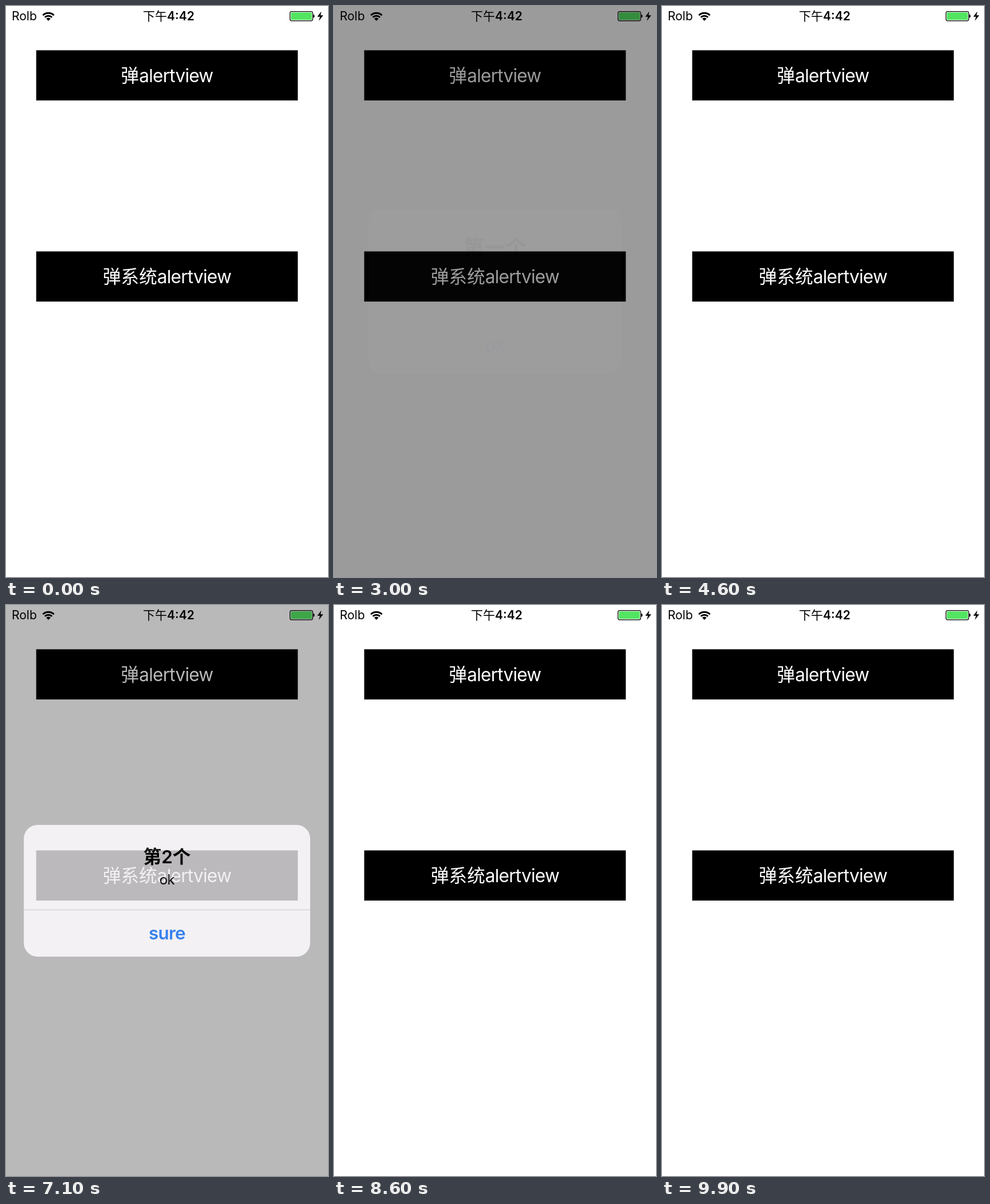
Animation of 562x997 px, one loop 10 s. Source, as an HTML page:

```html
<!DOCTYPE html>
<html lang="zh">
<head>
<meta charset="utf-8">
<title>alertview</title>
<style>
html, body { margin: 0; width: 100%; height: 100%; overflow: hidden; background: #fff; }
svg { display: block; width: 100%; height: 100%; }
text { font-family: Inter, "Noto Sans CJK SC", "Noto Sans CJK", sans-serif; }
.mid { text-anchor: middle; }
.tight { letter-spacing: -.025em; }
.label { font-size: 31.6px; }
</style>
</head>
<body>
<svg viewBox="0 0 562 997">
  <defs>
    <clipPath id="panelClip"><rect id="clipBox"/></clipPath>
    <filter id="soft" x="-20%" y="-100%" width="140%" height="300%"><feGaussianBlur stdDeviation="18"/></filter>
    <text id="sysLabel" class="label mid" x="281" y="483.8">弹系统<tspan class="tight">alertview</tspan></text>
  </defs>
  <rect width="562" height="997" fill="#fff"/>

  <text x="10" y="25.4" font-size="21">Rolb</text>
  <g fill="none" stroke="#000" stroke-width="2.8">
    <path d="M64.3 16.3A13.7 13.7 0 0 1 83.7 16.3M67.8 19.8A8.8 8.8 0 0 1 80.2 19.8"/>
    <path d="M74 26L70.1 22.1A5.5 5.5 0 0 1 77.9 22.1Z" fill="#000" stroke="none"/>
  </g>
  <text x="239" y="25.4" font-size="21" font-weight="600"><tspan font-weight="500">下午</tspan>4:42</text>
  <rect x="495.6" y="9.6" width="39.8" height="16.2" rx="3" fill="#fff" stroke="#000" stroke-width="1.2"/>
  <rect x="497.2" y="11.2" width="36.6" height="13" rx="1.5" fill="#53e562"/>
  <path d="M536.3 14.6Q538.6 15.2 538.6 17.7T536.3 20.8Z"/>
  <path d="M550.3 9.5L543.3 18.8H548L546 26L553.7 16.3H549Z"/>

  <rect x="52.7" y="77.3" width="456.6" height="87.6"/>
  <rect x="52.7" y="428.5" width="456.6" height="87.6"/>
  <g fill="#fff">
    <text class="label mid" x="281" y="132.6">弹<tspan class="tight">alertview</tspan></text>
    <use href="#sysLabel"/>
  </g>

  <rect id="dim" width="562" height="997" fill="#050005"/>
  <g id="panel">
    <g clip-path="url(#panelClip)">
      <rect width="562" height="997" fill="#fdfbfe"/>
      <g id="band">
        <rect id="bandBox" x="52.7" y="428.5" width="456.6" height="87.6"/>
        <use href="#sysLabel" fill="#fdfbfe"/>
      </g>
    </g>
    <g id="content">
      <text id="title" class="mid" x="281" font-weight="600"/>
      <text id="message" class="mid tight" x="281"/>
      <path id="rule" stroke="#d4d2d6" stroke-width="1.2"/>
      <text id="button" class="mid tight" x="281" fill="#1f78fa"/>
    </g>
  </g>
</svg>
<script>
const LOOP = 10000, STEP = 100, CX = 281, CY = 498.5;
const $ = id => document.getElementById(id);
const set = (id, attrs) => {
  for (const k in attrs) $(id).setAttribute(k, attrs[k]);
};

// Panel layouts; rest is the settled scale, grow and fade shape the entrance.
const custom = {
  x: 71, y: 362, w: 420, h: 273, r: 21, rest: .89, grow: .18, fade: .98, dimIn: 0,
  band: '#bebcbe', title: [35.1, 438], message: [28, 494], rule: 541.7, button: [31.6, 599], weight: 400
};
const system = {
  x: 31, y: 384, w: 500, h: 230, r: 24, rest: .948, grow: .2, fade: .55, dimIn: 1.1,
  band: '#dcdadc', title: [31.5, 450.8], message: [24, 487.5], rule: 532.3, button: [31.5, 584.5], weight: 600
};

// from/to: visible span, start: entrance origin, press: button held, out: fade begins.
const alerts = [
  { kind: custom, from: 1300, to: 3000, start: 1253, press: 2600, text: ['第2个', 'welcome', 'sure'] },
  { kind: custom, from: 3000, to: 4600, start: 3000, press: 4000, text: ['第一个', 'welcome', 'ok'] },
  { kind: system, from: 7100, to: 8600, start: 6937, out: 8100, text: ['第2个', 'ok', 'sure'] },
  { kind: system, from: 8700, to: 9900, start: 8100, out: 9500, text: ['第一个', 'welcome', 'sure'] }
];

let shown = null;

function layout(alert) {
  const k = alert.kind;
  set('clipBox', { x: k.x, y: k.y, width: k.w, height: k.h, rx: k.r });
  set('bandBox', { fill: k.band });
  set('rule', { d: `M${k.x} ${k.rule}h${k.w}` });
  ['title', 'message', 'button'].forEach((id, i) => {
    set(id, { 'font-size': k[id][0], y: k[id][1] });
    $(id).textContent = alert.text[i];
  });
  set('button', { 'font-weight': k.weight });
}

function render(t) {
  const alert = alerts.find(a => t >= a.from && t < a.to);
  set('panel', { visibility: alert ? 'visible' : 'hidden' });
  if (!alert) return set('dim', { opacity: 0 });
  if (alert !== shown) layout(shown = alert);

  const k = alert.kind;
  const n = (t - alert.start) / STEP;
  const e = n > 6 ? 0 : Math.pow(.45, n);
  const out = t >= alert.out ? Math.max(0, 1 - (t - alert.out + 60) / 450) : 1;
  const settled = e < .2 && out === 1;
  const s = k.rest * (1 + k.grow * e);
  const transform = `translate(${CX} ${CY}) scale(${s}) translate(${-CX} ${-CY})`;

  set('content', { transform });
  set('clipBox', { transform });
  set('panel', { opacity: (1 - k.fade * e) * out });
  set('dim', { opacity: .392 * (1 - k.dimIn * e) * out });
  set('band', { filter: settled ? 'url(#soft)' : 'none', opacity: settled ? .6 : 1 });
  set('button', { opacity: t >= alert.press ? .3 : 1 });
}

function tick() {
  const t = performance.now() % LOOP;
  render(Math.floor(t / STEP) * STEP);
  requestAnimationFrame(tick);
}
tick();
</script>
</body>
</html>
```
